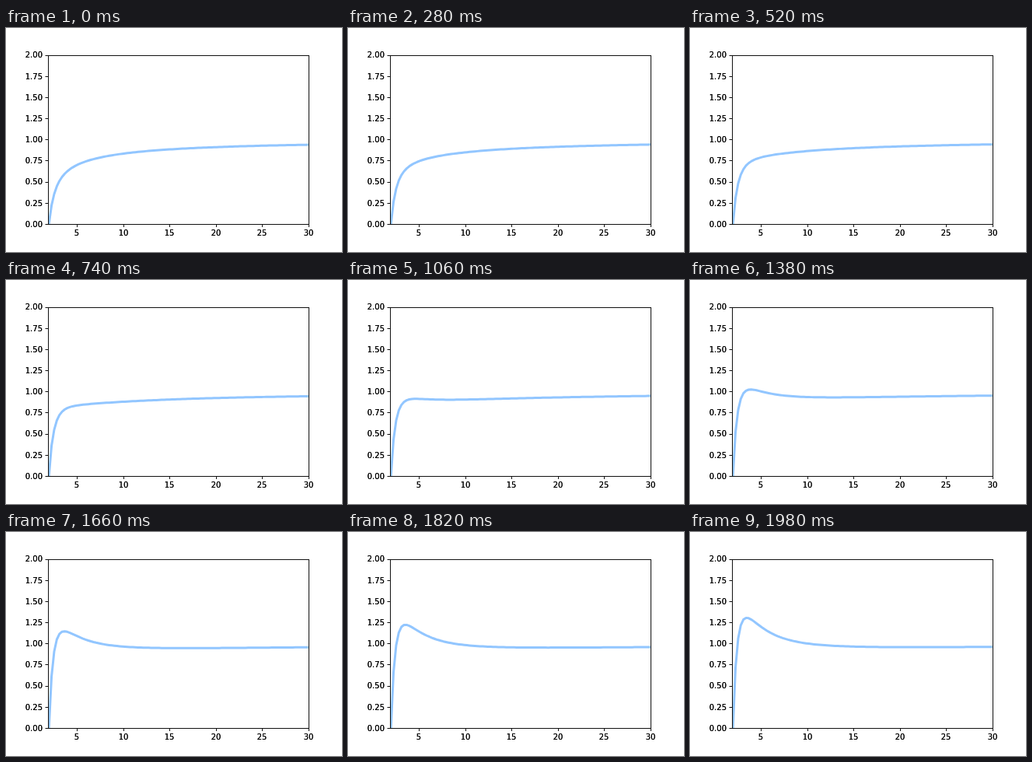
Write an HTML page with a canvas that moves like this. It is 432 by 288 pixels and loops after 2000 ms.

```html
<!DOCTYPE html>
<html lang="en">
<head>
<meta charset="utf-8">
<style>
  html, body { margin: 0; width: 100%; height: 100%; overflow: hidden; background: #fff; }
  canvas { display: block; width: 432px; height: 288px; }
</style>
</head>
<body>
<canvas id="plot" width="432" height="288"></canvas>
<script>
const ctx = document.getElementById('plot').getContext('2d');
const STEP = 20, STEPS = 100, POINTS = 100;
const L = 54, R = 388.8, T = 34.56, B = 252;
const xMin = 1.9, xMax = 30, yMax = 2;

const px = r => L + (r - xMin) / (xMax - xMin) * (R - L);
const py = v => B - v / yMax * (B - T);
const snap = v => Math.floor(v + 0.5) + 0.5;

// effective potential around a black hole of unit mass
const potential = (r, l) => (1 - 2 / r) * (1 + l * l / (r * r));

function segment(x1, y1, x2, y2) {
  ctx.beginPath();
  ctx.moveTo(x1, y1);
  ctx.lineTo(x2, y2);
  ctx.stroke();
}

function label(text, x, y, align) {
  ctx.textAlign = align;
  // two passes give the darker edges of the labels
  ctx.fillText(text, x, y);
  ctx.fillText(text, x, y);
}

function drawCurve(l) {
  ctx.save();
  ctx.beginPath();
  ctx.rect(L, T, R - L, B - T);
  ctx.clip();
  ctx.strokeStyle = '#92c6ff';
  ctx.lineWidth = 3;
  ctx.lineJoin = 'round';
  ctx.lineCap = 'square';
  ctx.beginPath();
  for (let i = 0; i < POINTS; i++) {
    const r = 2 + 28 * i / (POINTS - 1);
    ctx.lineTo(px(r), py(potential(r, l)));
  }
  ctx.stroke();
  ctx.restore();
}

function drawAxes() {
  const left = snap(L), right = snap(R), top = snap(T), bottom = snap(B);
  ctx.strokeStyle = '#111';
  ctx.fillStyle = '#000';
  ctx.lineWidth = 1;
  ctx.strokeRect(left, top, right - left, bottom - top);
  ctx.font = '10px "DejaVu Sans", sans-serif';
  ctx.textBaseline = 'alphabetic';
  for (let x = 5; x <= 30; x += 5) {
    const tx = snap(px(x));
    segment(tx, B, tx, B + 4);
    label(String(x), Math.round(px(x)), 267, 'center');
  }
  for (let y = 0; y <= yMax; y += 0.25) {
    const ty = snap(py(y));
    segment(L - 3.5, ty, L, ty);
    label(y.toFixed(2), 47, Math.round(py(y) + 3.8), 'right');
  }
}

function draw(time) {
  const n = Math.floor(time / STEP) % STEPS;
  ctx.fillStyle = '#fff';
  ctx.fillRect(0, 0, 432, 288);
  drawCurve(2 + 3 * n / (STEPS - 1));
  drawAxes();
}

const start = performance.now();
function tick() {
  draw(performance.now() - start);
  requestAnimationFrame(tick);
}
tick();
</script>
</body>
</html>
```
